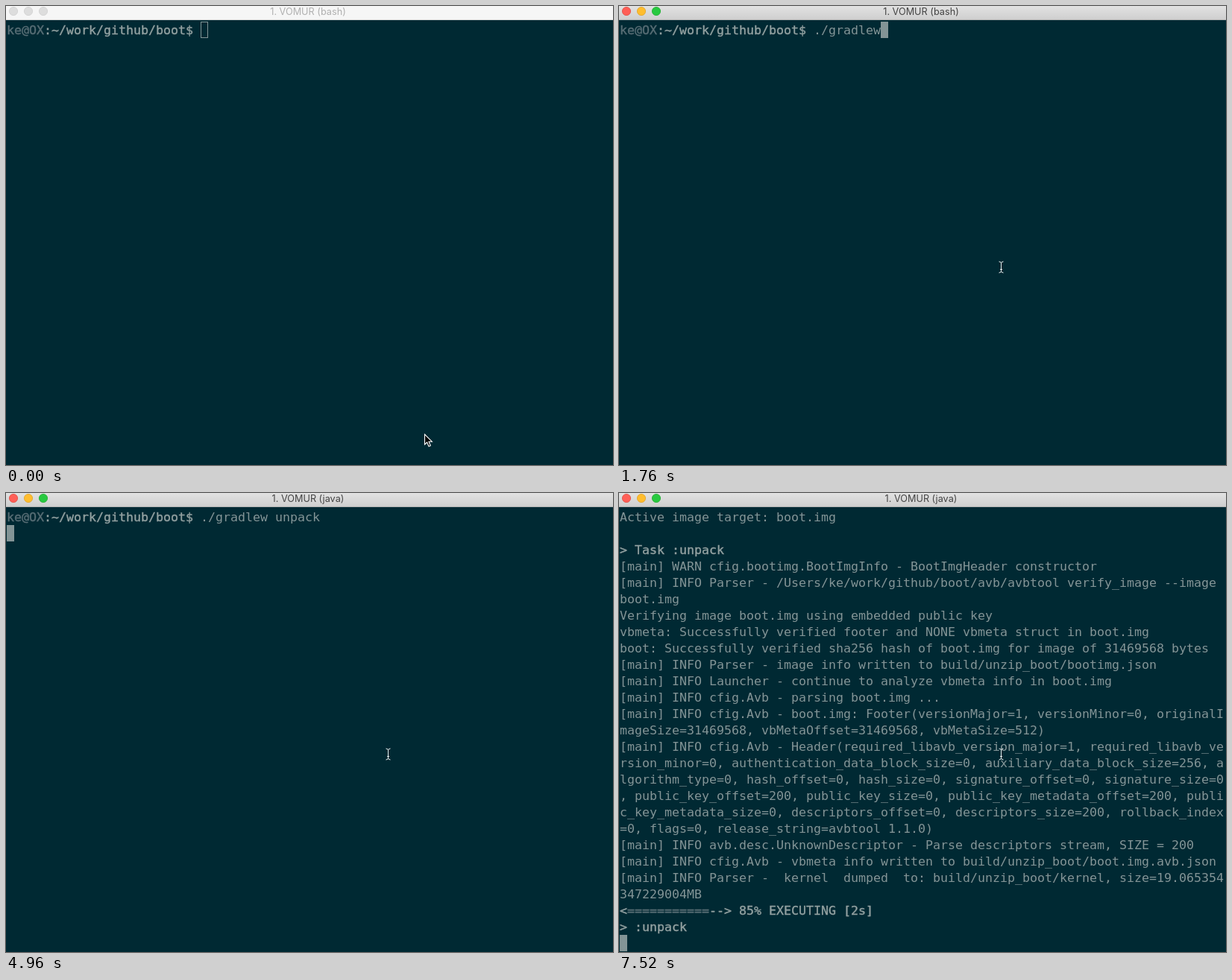
An HTML page with a canvas that plays this animation: 814 px wide and 616 px high, repeating every 8000 ms.

```html
<!DOCTYPE html>
<html lang="en">
<head>
<meta charset="utf-8">
<title>Terminal</title>
<style>
  html, body { margin: 0; width: 100%; height: 100%; overflow: hidden; background: #002933; }
  canvas { display: block; width: 814px; height: 616px; }
</style>
</head>
<body>
<canvas id="stage" width="814" height="616"></canvas>
<script>
const ctx = document.getElementById('stage').getContext('2d');
const W = 814, H = 616, LOOP = 8000;
const CELL = 10, ROW = 22, LEFT = 1, TOP = 21;
const BG = '#002933', FG = '#839496', BRIGHT = '#93a1a1', DIM = '#586e75';
const MONO = '16.61px "DejaVu Sans Mono", monospace';

// Text runs: [text, style]
const plain = s => [[s, 'plain']];
const bold = s => [[s, 'bold']];
const PROMPT = [['ke@OX', 'dim'], [':~/work/github/boot$ ', 'bold']];
const COMMAND = './gradlew unpack';
const TARGET = plain('Active image target: boot.img');

// Each entry: time, number of command characters typed by then
const TYPED = [
  [800, 1], [1120, 2], [1280, 3], [1440, 8], [1760, 9], [1920, 10],
  [2240, 11], [2560, 13], [2720, 15], [2880, 16]
];

const LOG = `[main] WARN cfig.bootimg.BootImgInfo - BootImgHeader constructor
[main] INFO Parser - /Users/ke/work/github/boot/avb/avbtool verify_image --image
boot.img
Verifying image boot.img using embedded public key
vbmeta: Successfully verified footer and NONE vbmeta struct in boot.img
boot: Successfully verified sha256 hash of boot.img for image of 31469568 bytes
[main] INFO Parser - image info written to build/unzip_boot/bootimg.json
[main] INFO Launcher - continue to analyze vbmeta info in boot.img
[main] INFO cfig.Avb - parsing boot.img ...
[main] INFO cfig.Avb - boot.img: Footer(versionMajor=1, versionMinor=0, originalI
mageSize=31469568, vbMetaOffset=31469568, vbMetaSize=512)
[main] INFO cfig.Avb - Header(required_libavb_version_major=1, required_libavb_ve
rsion_minor=0, authentication_data_block_size=0, auxiliary_data_block_size=256, a
lgorithm_type=0, hash_offset=0, hash_size=0, signature_offset=0, signature_size=0
, public_key_offset=200, public_key_size=0, public_key_metadata_offset=200, publi
c_key_metadata_size=0, descriptors_offset=0, descriptors_size=200, rollback_index
=0, flags=0, release_string=avbtool 1.1.0)
[main] INFO avb.desc.UnknownDescriptor - Parse descriptors stream, SIZE = 200
[main] INFO cfig.Avb - vbmeta info written to build/unzip_boot/boot.img.avb.json
[main] INFO Parser -  kernel  dumped  to: build/unzip_boot/kernel, size=19.065354
347229004MB`.split('\n').map(plain);

function progress(percent, phase, seconds) {
  const done = Math.floor(13 * percent / 100);
  return [
    ['<', 'bold'],
    ['='.repeat(done), 'dim'],
    ['-'.repeat(13 - done) + `> ${percent}% ${phase} [${seconds}s]`, 'bold']
  ];
}

function typedCount(t) {
  let count = 0;
  for (const [time, n] of TYPED) if (t >= time) count = n;
  return count;
}

// The last line is where the cursor stands
function linesAt(t) {
  const first = [...PROMPT, [COMMAND.slice(0, typedCount(t)), 'plain']];
  if (t < 4320) return [first];
  if (t < 5280) return [first, []];
  if (t < 5440) {
    return [first, progress(0, 'INITIALIZING', 0), bold('> Evaluating settings'), []];
  }
  const seconds = t < 6240 ? 0 : t < 7200 ? 1 : 2;
  const status = t < 5600
    ? [progress(100, 'CONFIGURING', 0), plain('> IDLE'), []]
    : [progress(85, 'EXECUTING', seconds), bold('> :unpack'), []];
  if (t < 7520) {
    return [first, [], bold('> Configure project :'), TARGET, ...status];
  }
  return [TARGET, [], bold('> Task :unpack'), ...LOG, ...status];
}

function drawLine(runs, row) {
  let col = 0;
  const y = TOP + row * ROW + 17;
  for (const [text, style] of runs) {
    const x = LEFT + col * CELL;
    const color = { plain: FG, bold: BRIGHT, dim: DIM }[style];
    ctx.fillStyle = ctx.strokeStyle = color;
    ctx.fillText(text, x, y);
    if (style !== 'plain') {
      ctx.lineWidth = 0.4;
      ctx.strokeText(text, x, y);
    }
    col += text.length;
  }
  return col;
}

function drawTerminal(t, active) {
  ctx.font = MONO;
  ctx.textAlign = 'left';
  const lines = linesAt(t);
  let col = 0;
  lines.forEach((runs, row) => { col = drawLine(runs, row); });
  const x = LEFT + col * CELL, y = TOP + (lines.length - 1) * ROW;
  if (active) {
    ctx.fillStyle = FG;
    ctx.fillRect(x, y, CELL, ROW);
  } else {
    ctx.strokeStyle = FG;
    ctx.lineWidth = 1;
    ctx.strokeRect(x + 0.5, y + 0.5, CELL - 1, ROW - 1);
  }
}

function drawTitleBar(t, active) {
  const shade = ctx.createLinearGradient(0, 0, 0, 18);
  shade.addColorStop(0, active ? '#e2e2e2' : '#f6f6f6');
  shade.addColorStop(1, active ? '#cfcfcf' : '#f6f6f6');
  ctx.fillStyle = shade;
  ctx.fillRect(0, 0, W, 18);
  ctx.fillStyle = active ? '#b1b1b1' : '#d6d6d6';
  ctx.fillRect(0, 18, W, 1);

  const lights = active
    ? [['#ff5f57', '#e24b41'], ['#ffbd2e', '#e1a325'], ['#28c940', '#1fad2f']]
    : Array(3).fill(['#dddddd', '#d0d0d0']);
  lights.forEach(([fill, edge], i) => {
    ctx.beginPath();
    ctx.arc(10 + 20 * i, 7, 5.6, 0, Math.PI * 2);
    ctx.fillStyle = fill;
    ctx.strokeStyle = edge;
    ctx.lineWidth = 0.8;
    ctx.fill();
    ctx.stroke();
  });

  ctx.font = '12.7px Inter, sans-serif';
  ctx.textAlign = 'center';
  ctx.fillStyle = active ? '#444444' : '#b0b0b0';
  ctx.fillText(`1. VOMUR (${t < 4960 ? 'bash' : 'java'})`, 405, 12);
}

function drawArrow(x, y) {
  ctx.save();
  ctx.translate(x, y);
  ctx.beginPath();
  for (const [px, py] of [[0.5, 0.8], [0.5, 14.4], [3.6, 11.5], [6, 17],
                          [8.3, 16], [6, 10.7], [10.3, 10.7]]) ctx.lineTo(px, py);
  ctx.closePath();
  ctx.fillStyle = '#000';
  ctx.strokeStyle = '#fff';
  ctx.lineWidth = 1.1;
  ctx.fill();
  ctx.stroke();
  ctx.restore();
}

function drawBeam(x, y) {
  ctx.beginPath();
  for (const s of [-1, 1]) {
    ctx.moveTo(x - 3, y + 7.5 * s);
    ctx.quadraticCurveTo(x, y + 7.5 * s, x, y + 5 * s);
    ctx.quadraticCurveTo(x, y + 7.5 * s, x + 3, y + 7.5 * s);
  }
  ctx.moveTo(x, y - 5.5);
  ctx.lineTo(x, y + 5.5);
  ctx.moveTo(x - 1.5, y + 3);
  ctx.lineTo(x + 1.5, y + 3);
  ctx.strokeStyle = '#e8ecec';
  ctx.lineWidth = 1;
  ctx.stroke();
}

function draw(t) {
  const active = t >= 320;
  ctx.fillStyle = BG;
  ctx.fillRect(0, 0, W, H);
  drawTerminal(t, active);
  drawTitleBar(t, active);
  if (active) drawBeam(512.5, 350.5);
  else if (t < 160) drawArrow(561, 574);
  else drawArrow(513, 355);
}

const start = performance.now();
function tick() {
  draw((performance.now() - start) % LOOP);
  requestAnimationFrame(tick);
}
tick();
</script>
</body>
</html>
```
